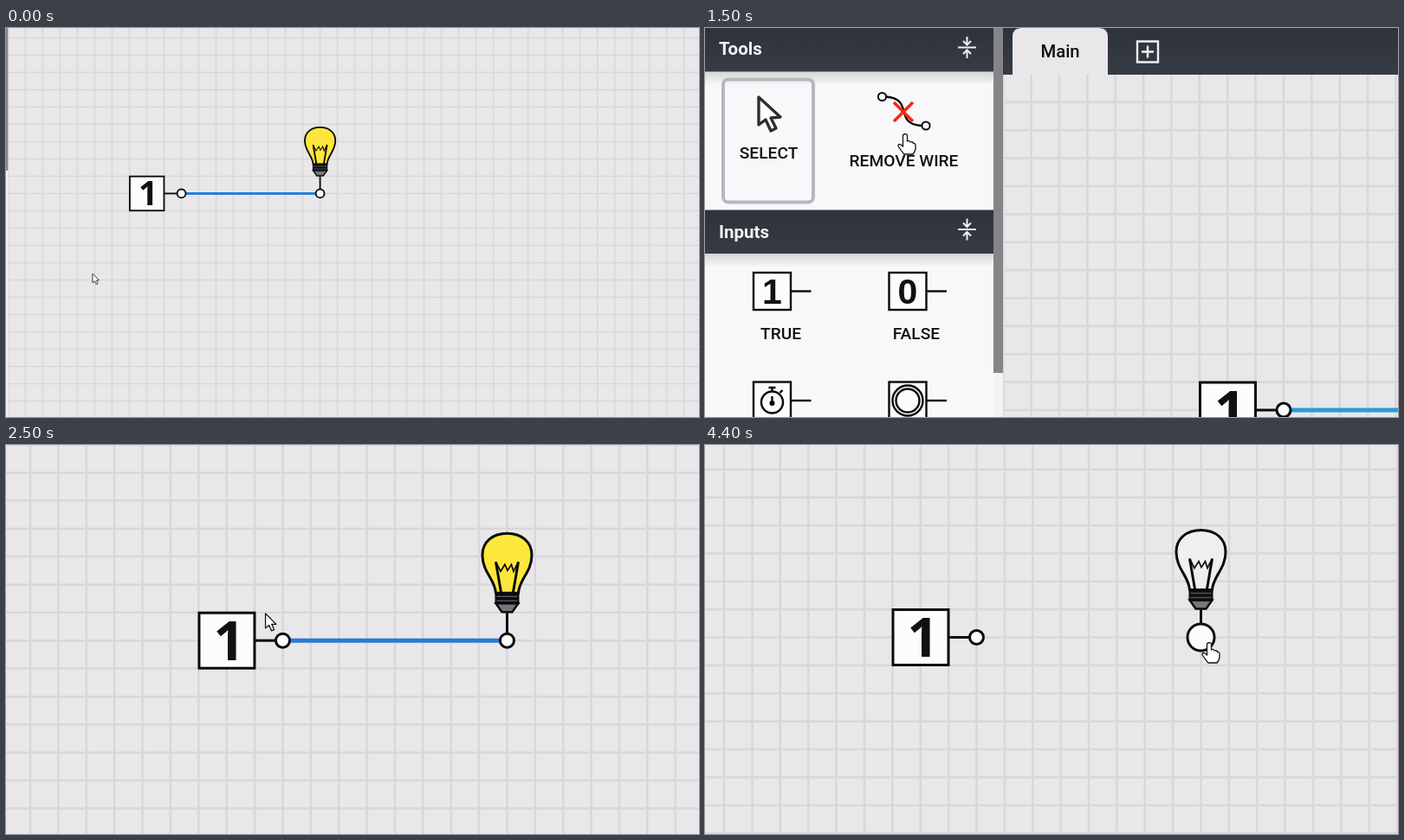
An HTML page for the animation above (4.5 s loop, 800x450 px).

```html
<!DOCTYPE html>
<html lang="en">
<head>
<meta charset="utf-8">
<title>Removing a wire</title>
<style>
  html, body { margin: 0; width: 100%; height: 100%; overflow: hidden; background: #e9e7ea; }
  svg { display: block; width: 800px; height: 450px; }
  .line { fill: none; stroke: #0b0b0d; stroke-width: 3; }
  .box { fill: #fcfbfe; stroke: #0b0b0d; stroke-width: 3; }
  .thin { stroke-width: 2.4; }
  text { font-family: Roboto, "Open Sans", sans-serif; font-size: 19.2px; font-weight: 500; fill: #111; }
  .label { text-anchor: middle; }
  .head { font-size: 20.5px; font-weight: 600; fill: #f4f4f6; }
  .digit { font-family: "Liberation Sans", Arial, sans-serif; font-weight: bold; text-anchor: middle; }
  .big { font-family: "Open Sans", "Noto Sans", sans-serif; font-size: 63px; }
  .white { fill: none; stroke: #f0f0f2; stroke-width: 2; }
  .cursor { fill: #fff; stroke: #111; stroke-width: 1.3; stroke-linejoin: round; }
</style>
</head>
<body>
<svg viewBox="0 0 800 450">
  <defs>
    <linearGradient id="dark" x2="0" y2="1">
      <stop stop-color="#2d333b"/><stop offset="1" stop-color="#363b44"/>
    </linearGradient>
    <linearGradient id="shade" x2="0" y2="1">
      <stop stop-color="#000" stop-opacity=".14"/><stop offset="1" stop-color="#000" stop-opacity="0"/>
    </linearGradient>
    <g id="header">
      <rect width="333" height="50.5" fill="url(#dark)"/>
      <rect y="50.5" width="333" height="16" fill="url(#shade)"/>
      <path class="white" d="M292 22.5H313M302.5 10V19M298 15L302.5 19.5L307 15M302.5 35V26M298 30L302.5 25.5L307 30"/>
    </g>
    <g id="part">
      <rect class="box thin" x="-21.5" y="-21.5" width="43" height="43"/>
      <path class="line thin" d="M22 0H45"/>
    </g>
  </defs>
  <g id="world">
    <path id="grid" fill="none" stroke="#d9d7da" stroke-width="2.6"/>

    <!-- circuit -->
    <path id="wire" d="M668 442H927" fill="none" stroke-width="5"/>
    <path id="cut" fill="none" stroke="#f85a47" stroke-width="5.5" stroke-linecap="round"/>
    <path class="line" d="M636 442H660"/>
    <rect class="box" x="571.5" y="410" width="64" height="64"/>
    <text class="digit big" x="606" y="464.5">1</text>
    <g transform="translate(927 442)">
      <path class="line" d="M0-32V0"/>
      <path id="glass" class="line"
        d="M-13-55C-14-71-28.5-79-28.5-99C-28.5-114-17-124 0-124C17-124 28.5-114 28.5-99C28.5-79 14-71 13-55Z"/>
      <path class="line" d="M-7-56L-13-91M7-56L13-91"/>
      <path class="line" style="stroke-width:1.7" d="M-13-91L-7.5-80L-2.5-88L.5-81L5-88L7.5-80L13-91"/>
      <path d="M-13-43H13L6-33H-6Z" fill="#77777a" stroke="#0b0b0d" stroke-width="2.4"/>
      <rect x="-14" y="-56" width="28" height="14" fill="#0b0b0d"/>
      <path d="M-12-51H12M-12-46H12" stroke="#55555a" stroke-width="1.6"/>
    </g>
    <circle id="from" class="box" cx="668" cy="442"/>
    <circle id="to" class="box" cx="927" cy="442"/>

    <!-- tab bar -->
    <rect x="333" width="1400" height="54" fill="url(#dark)"/>
    <path d="M355 54V10Q355 0 365 0H455Q465 0 465 10V54Z" fill="#e9e7ea"/>
    <text class="label" x="410" y="33.5" style="font-size:20.3px">Main</text>
    <path class="white" style="stroke-width:2.4" d="M499 15.5H523V39.5H499ZM511 20.5V34.5M504 27.5H518"/>

    <!-- side panel -->
    <rect x="-20" width="353" height="1000" fill="#f7f8fa"/>
    <rect x="333" width="11" height="1000" fill="#f3f3f5"/>
    <rect x="333" width="11" height="399" fill="#858487"/>
    <use href="#header"/>
    <text class="head" x="16" y="31">Tools</text>
    <use href="#header" y="210.5"/>
    <text class="head" x="16" y="243">Inputs</text>
    <rect id="picked" y="59.5" height="142" rx="6" fill="none" stroke="#b6b7bd" stroke-width="4"/>
    <path d="M62 80V112L70 106L76 119L82 116L76 104L87 103Z" fill="#fff" stroke="#2f2f33" stroke-width="3.4" stroke-linejoin="round"/>
    <text class="label" x="73.5" y="151">SELECT</text>
    <path class="line thin" d="M209 79.5C242 82 217 111 250 113"/>
    <circle class="box" style="stroke-width:2" cx="204.5" cy="79.5" r="4.6"/>
    <circle class="box" style="stroke-width:2" cx="255" cy="113" r="4.6"/>
    <path d="M218 86L240 108M240 86L218 108" stroke="#f52a14" stroke-width="3.6"/>
    <text class="label" x="229.5" y="160">REMOVE WIRE</text>

    <g transform="translate(77.5 304.5)">
      <use href="#part"/>
      <text class="digit" y="14.5" style="font-size:41px">1</text>
      <text class="label" x="10" y="55">TRUE</text>
    </g>
    <g transform="translate(234 304.5)">
      <use href="#part"/>
      <text class="digit" y="14.5" style="font-size:41px">0</text>
      <text class="label" x="10" y="55">FALSE</text>
    </g>
    <g transform="translate(77.5 431)">
      <use href="#part"/>
      <circle class="line thin" cy="2" r="12.5"/>
      <path class="line thin" d="M-4-15H4M0-15V-10M9-9L12-12M0 3V-5"/>
      <circle cy="3" r="3"/>
      <text class="label" x="10" y="54">CLOCK</text>
    </g>
    <g transform="translate(234 431)">
      <use href="#part"/>
      <circle class="line thin" r="17.5"/>
      <circle class="line thin" r="13.5"/>
      <text class="label" x="10" y="54">BUTTON</text>
    </g>
    <g transform="translate(154.5 557.5)">
      <use href="#part"/>
      <rect class="line" x="-12" y="-16" width="24" height="32"/>
      <path class="line thin" d="M-12 2H12M0 5V13"/>
      <circle class="line thin" cy="-7" r="4"/>
      <text class="label" x="10" y="54">SWITCH</text>
    </g>

    <g id="pointer">
      <path id="arrow" class="cursor" d="M0 0V17L4 13.5L7 20L10 18.7L7.2 12.5H12.3Z"/>
      <path id="hand" class="cursor" d="M-2.5 1Q0-2 2.5 1V8Q5 6.5 6 9Q9 8 9.5 10.5Q12 10 12 13V17Q11 21 9 23H-1Q-4 20-8 13.5Q-8 10.5-5 12L-2.5 14Z"/>
    </g>
  </g>
</svg>
<script>
const LOOP = 4500, STEP = 100, CELL = 32.375;
const FROM = [668, 442], TO = [927, 442];
const PICK = 1600, GRAB = 2900, RELEASE = 4300;

// time, scale, x, y
const ZOOM = [
  [0, .618, -210.3, -81.7], [400, .78, -119, -45.8],
  [800, .964, -20.4, -7.6], [900, 1, 0, 0]
];
// time, x, y
const PATH = [
  [0, 502, 592], [400, 341, 314], [800, 249, 156], [1000, 231, 123], [PICK, 231, 123],
  [2100, 572.5, 289.5], [2600, 667, 441], [GRAB, 670, 443], [3050, 698, 407],
  [3200, 740.5, 405.5], [3500, 825, 412], [3850, 930, 445], [4000, 936.5, 448.5]
];

const $ = id => document.getElementById(id);
const set = (id, attrs) => {
  for (const name in attrs) $(id).setAttribute(name, attrs[name]);
};
const show = (id, on) => set(id, { visibility: on ? "visible" : "hidden" });
const clamp = v => Math.min(1, Math.max(0, v));
const mix = (a, b, p) => a + (b - a) * p;

function along(keys, t) {
  const i = keys.findIndex(k => k[0] > t);
  if (i < 0) return keys[keys.length - 1].slice(1);
  const a = keys[i - 1], b = keys[i], p = (t - a[0]) / (b[0] - a[0]);
  return a.slice(1).map((v, n) => mix(v, b[n + 1], p));
}

function camera(t) {
  const [scale, x, y] = along(ZOOM, t);
  const p = clamp((t - 1586) / 990), pan = p * p * (3 - 2 * p);
  return [scale, x - 354.5 * pan, y - 219.5 * pan];
}

function drawGrid() {
  let d = "";
  for (let x = FROM[0] - 10 * CELL; x < 1700; x += CELL) d += `M${x} 54V1000`;
  for (let y = FROM[1] - 11 * CELL; y < 1000; y += CELL) d += `M344 ${y}H1700`;
  set("grid", { d });
}

function draw(t) {
  const [scale, cx, cy] = camera(t);
  set("world", { transform: `translate(${cx} ${cy}) scale(${scale})` });

  const [x, y] = along(PATH, t);
  const near = ([nx, ny]) => Math.hypot(x - nx, y - ny) < 16;
  const onTool = x < 310 && y > 55 && y < 205;
  const hand = onTool || near(FROM) || near(TO);
  set("pointer", { transform: `translate(${x} ${y})` });
  show("hand", hand);
  show("arrow", !hand);
  set("from", { r: near(FROM) ? 15.5 : 8 });
  set("to", { r: near(TO) ? 15.5 : 8 });

  const picked = t >= PICK;
  set("picked", { x: picked ? 150 : 21, width: picked ? 159.5 : 104 });

  const lit = t < RELEASE;
  const glow = .5 + .5 * Math.cos((t - 1150) / 1500 * Math.PI);
  set("wire", { stroke: `hsl(${mix(212, 198, glow)} 68% 50%)` });
  show("wire", lit);
  set("glass", { style: `fill:${lit ? "#fee73c" : "#efeef1"}` });

  // The dragged wire trails slightly behind the pointer.
  const [ex, ey] = along(PATH, Math.max(GRAB, t - 60));
  set("cut", { d: `M${FROM}C${FROM[0] + 100} ${FROM[1]} ${ex - 100} ${ey} ${ex} ${ey}` });
  show("cut", t > GRAB && lit);
}

drawGrid();
const start = performance.now();
function tick() {
  const t = (performance.now() - start) % LOOP;
  draw(Math.floor(t / STEP) * STEP);
  requestAnimationFrame(tick);
}
tick();
</script>
</body>
</html>
```
